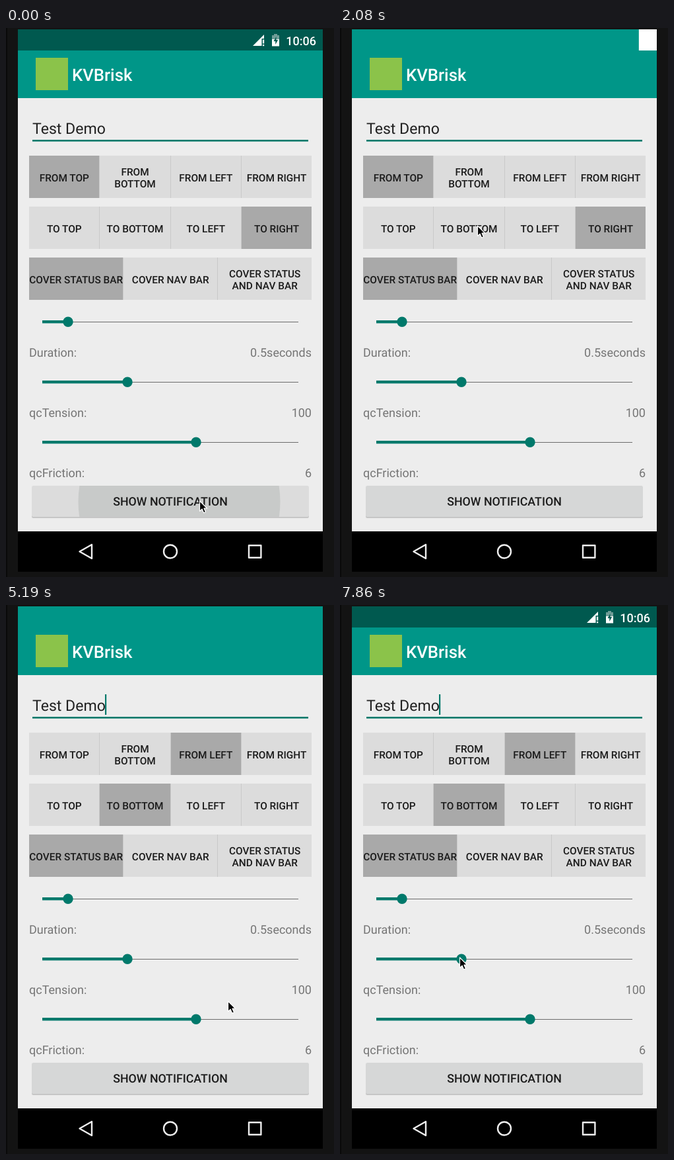
Animation, 497 px wide and 830 px high, one loop 8000 ms. Source, as an HTML page:

```html
<!DOCTYPE html>
<html lang="en">
<head>
<meta charset="utf-8">
<title>Toast demo</title>
<style>
  html, body { margin: 0; width: 100%; height: 100%; overflow: hidden; background: #131313; }
  svg { display: block; width: 497px; height: 830px; }
  text { font-family: Roboto, "Noto Sans", sans-serif; font-size: 18px; text-rendering: geometricPrecision; }
  .medium { font-weight: 500; }
  .choice { font-weight: 500; font-size: 15.4px; fill: #1b1b1b; text-anchor: middle; }
  .label { fill: #757575; }
  .end { text-anchor: end; }
  .mid { text-anchor: middle; }
</style>
</head>
<body>
<svg id="stage" viewBox="0 0 497 830" xmlns="http://www.w3.org/2000/svg">
  <defs>
    <clipPath id="barClip"><rect x="18" y="2" width="462" height="32"/></clipPath>
    <clipPath id="buttonClip"><rect x="39" y="692" width="420" height="47" rx="2.5"/></clipPath>
  </defs>

  <rect width="497" height="830" fill="#131313"/>
  <rect width="2" height="830" fill="#0a0a0a"/>
  <rect x="18" y="2" width="462" height="759" fill="#ededed"/>
  <rect x="18" y="2" width="462" height="104" fill="#009688"/>
  <rect x="45" y="45" width="49" height="49" fill="#8bc34a"/>
  <text x="100" y="80" class="medium" fill="#fff" style="font-size:25.7px">KVBrisk</text>

  <g id="status">
    <rect x="18" y="2" width="462" height="32" fill="#00594f"/>
    <path d="M374 27L391 10V16H387.5V27Z" fill="#fff"/>
    <path d="M389 17.5h2.2v6h-2.2zM389 25h2.2v2.2h-2.2z" fill="#fff"/>
    <path d="M403 11h3v-2h5v2h3v6h-11z" fill="#6f9d97"/>
    <path d="M403 17h11v10.5h-11z" fill="#fff"/>
    <path d="M409.5 13l-4 7h2.8v5l3.8-7h-2.6z" fill="#00594f"/>
    <text x="470" y="25.5" class="medium end" fill="#fff">10:06</text>
  </g>

  <g clip-path="url(#barClip)">
    <g id="toast">
      <rect x="18" y="2" width="462" height="32" fill="#fff"/>
      <text x="249" y="25" class="mid" fill="#3a3a3a">Test Demo</text>
    </g>
  </g>

  <text x="40" y="160" fill="#212121" style="font-size:23.1px">Test Demo</text>
  <rect x="40" y="169" width="418" height="2.6" fill="#00796b"/>
  <rect id="caret" x="150" y="135" width="2.2" height="31" fill="#00796b"/>

  <g id="choices"></g>
  <g id="sliders"></g>

  <rect x="39" y="693.5" width="420" height="47.5" rx="2.5" fill="#c6c6c6"/>
  <rect id="button" x="39" y="692" width="420" height="47" rx="2.5"/>
  <circle id="ripple" cx="262.5" cy="716" fill="#c8cac9" clip-path="url(#buttonClip)"/>
  <text x="249" y="722" class="medium mid" fill="#1b1b1b" style="font-size:17.8px">SHOW NOTIFICATION</text>

  <rect x="18" y="761" width="462" height="61" fill="#000"/>
  <g fill="none" stroke="#eee" stroke-width="2.4" stroke-linejoin="round">
    <path d="M111.5 791.5L130 781V802Z"/>
    <circle cx="249" cy="791.5" r="10"/>
    <rect x="368" y="782.3" width="18.4" height="18.4"/>
  </g>

  <path id="cursor" d="M-.5 -1V14.5L3.1 11.2L5.6 17L8.5 15.8L6 10.2H10.8Z"
        fill="#000" stroke="#fff" stroke-width="1.2" stroke-linejoin="round"/>
</svg>
<script>
const LOOP = 8000, STEP = LOOP / 54;
const $ = id => document.getElementById(id);

// Static rows of toggle buttons
const rows = [
  { y: 193, labels: ["FROM TOP", "FROM|BOTTOM", "FROM LEFT", "FROM RIGHT"] },
  { y: 270, labels: ["TO TOP", "TO BOTTOM", "TO LEFT", "TO RIGHT"] },
  { y: 347, labels: ["COVER STATUS BAR", "COVER NAV BAR", "COVER STATUS|AND NAV BAR"] }
];

function choiceMarkup(label, c, row, r) {
  const pitch = 429 / row.labels.length;
  const x = Math.round(35 + c * pitch), right = Math.round(34 + (c + 1) * pitch);
  const lines = label.split("|");
  const texts = lines.map((line, i) =>
    `<text class="choice" x="${34.7 + (c + .5) * pitch}" y="${row.y + 38.5 + 18 * (i - (lines.length - 1) / 2)}">${line}</text>`);
  return `<rect id="choice${r}${c}" x="${x}" y="${row.y}" width="${right - x}" height="64"/>
    <rect x="${right}" y="${row.y}" width="${right < 463 ? 1 : 0}" height="64" fill="#c9c9c9"/>${texts.join("")}`;
}

$("choices").innerHTML = rows.map((row, r) =>
  row.labels.map((label, c) => choiceMarkup(label, c, row, r)).join("")).join("");

$("sliders").innerHTML = [
  ["Duration:", "0.5seconds", 94],
  ["qcTension:", "100", 184],
  ["qcFriction:", "6", 288]
].map(([name, value, x], i) => {
  const y = 444 + 91 * i;
  return `<rect x="55" y="${y}" width="388" height="1" fill="#6c6c6c"/>
    <rect x="55" y="${y - 2}" width="${x - 55}" height="4.4" fill="#00796b"/>
    <circle cx="${x}" cy="${y + .3}" r="7.7" fill="#00796b"/>
    <text class="label" x="35" y="${y + 53}">${name}</text>
    <text class="label end" x="463" y="${y + 53}">${value}</text>`;
}).join("");

// Pointer stops: step, x, y
const pointerPath = [
  [0, 294, 716], [1, 294, 716], [7, 267, 340], [8, 267, 340], [14, 209, 300],
  [19, 209, 300], [23, 292, 228], [25, 292, 228], [28, 341, 628], [30, 337, 711],
  [32, 337, 711], [35, 337, 600], [48, 337, 600], [51, 222, 551], [53, 182, 534]
];
const caretSpans = [[4, 7], [10, 13], [17, 20], [26, 30], [33, 36], [44, 46], [50, 54]];

function pointerAt(n) {
  const i = Math.max(1, pointerPath.findIndex(p => p[0] >= n));
  const [n0, x0, y0] = pointerPath[i - 1], [n1, x1, y1] = pointerPath[i];
  const u = (n - n0) / (n1 - n0), e = u * u * (3 - 2 * u);
  return [x0 + (x1 - x0) * e, y0 + (y1 - y0) * e];
}

// Underdamped spring from 0 to 1, time in ms
function spring(ms) {
  if (ms <= 0) return 0;
  const omega = 21.15, zeta = .411, t = ms / 1000;
  const wd = omega * Math.sqrt(1 - zeta * zeta);
  return 1 - Math.exp(-zeta * omega * t) *
    (Math.cos(wd * t) + zeta * omega / wd * Math.sin(wd * t));
}

function select(r, chosen) {
  rows[r].labels.forEach((_, c) =>
    $(`choice${r}${c}`).setAttribute("fill", c === chosen ? "#a9a9a9" : "#dcdcdc"));
}

const show = (id, visible) => $(id).setAttribute("visibility", visible ? "visible" : "hidden");
const move = (id, x, y) => $(id).setAttribute("transform", `translate(${x.toFixed(2)} ${y.toFixed(2)})`);

function render(time) {
  const n = Math.floor((time + 4) / STEP) % 54;
  const second = n >= 32;
  const k = second ? n - 32 : n;
  const ms = k * STEP;

  show("status", k < 2 || k >= 20);

  const enter = spring(ms - 480) - 1, leave = spring(ms - 1747);
  show("toast", ms > 480 && k < 16);
  if (second) move("toast", enter * 462, leave * 30.8);
  else move("toast", leave * 462, enter * 32);

  select(0, n >= 25 ? 2 : 0);
  select(1, n >= 18 ? 1 : 3);
  select(2, 0);
  show("caret", caretSpans.some(([a, b]) => n >= a && n < b));

  $("button").setAttribute("fill", k === 0 ? "#dcdcdc" : "#d6d7d7");
  $("ripple").setAttribute("r", 153 + 90 * k);
  $("ripple").setAttribute("opacity", Math.max(0, 1 - k / 2));

  move("cursor", ...pointerAt(n));
}

function tick() {
  render(performance.now() % LOOP);
  requestAnimationFrame(tick);
}
tick();
</script>
</body>
</html>
```
